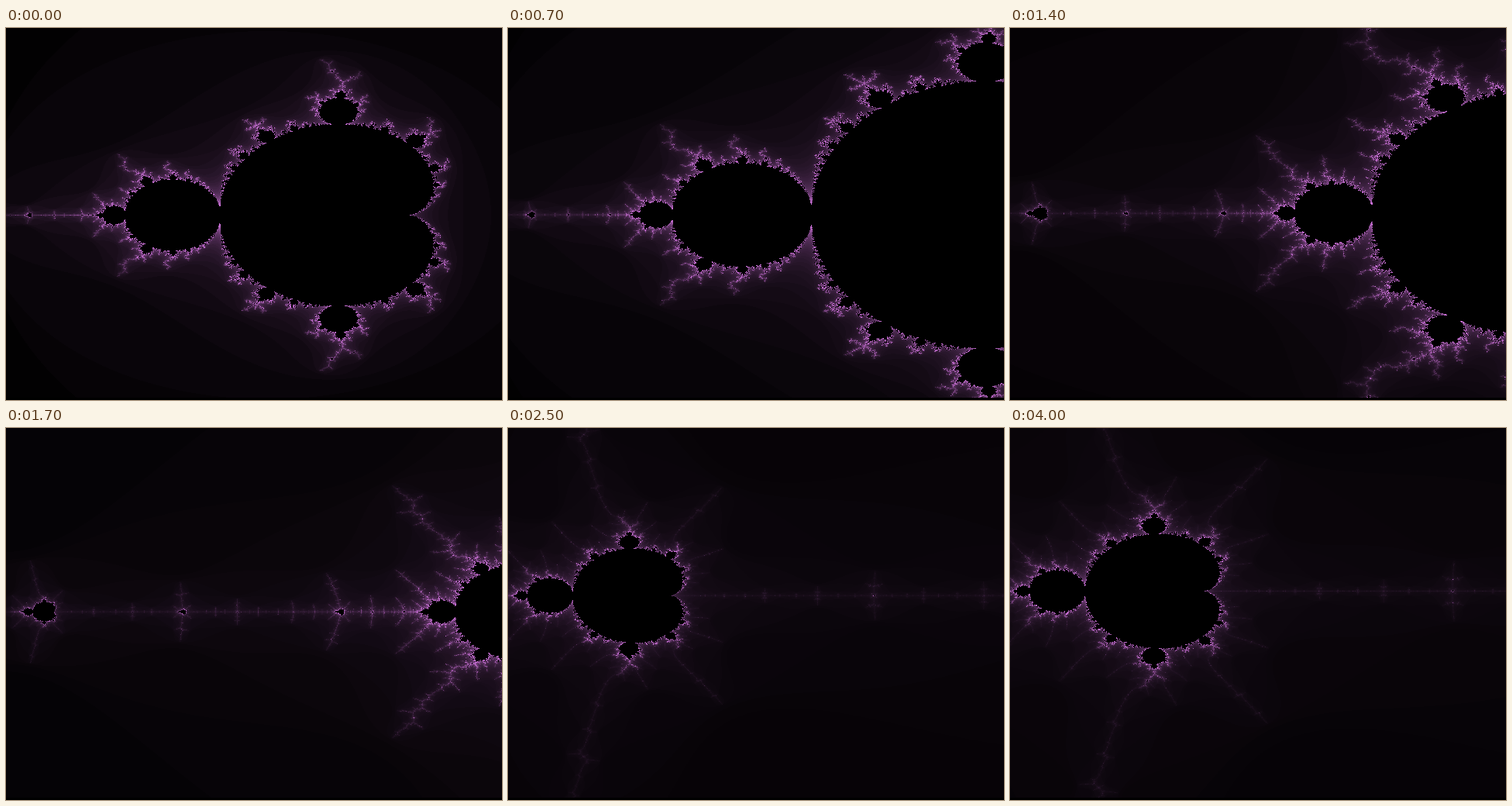
An HTML page with a canvas that plays this animation: 640x480 px, repeating every 4.7 s.

```html
<!DOCTYPE html>
<html lang="en">
<head>
<meta charset="utf-8">
<title>Mandelbrot zoom</title>
<style>
  html, body { margin: 0; width: 100%; height: 100%; overflow: hidden; background: #000; }
  canvas { display: block; width: 640px; height: 480px; }
</style>
</head>
<body>
<canvas id="stage" width="640" height="480"></canvas>
<script>
const W = 640, H = 480, VISIBLE_ROWS = 477;
const LOOP = 4700, STEP = 100, ZOOM_START = 400, LAST_STEP = 23;
const ASPECT = 0.736;

// Complex number under the pointer, and the pointer's row.
const anchor = { re: -1.7776, im: 0.00526, y: 241.9 };

// [step, natural log of pixels per unit, pointer column]
const zoomKeys = [[0, 5.497, 25.3], [3, 5.882, 23.3], [6, 6.2626, 22], [10, 6.738, 22],
                  [12, 7.01, 22], [18, 8.256, 22], [21, 8.82, 22], [23, 9.0186, 22]];

const ctx = document.getElementById('stage').getContext('2d');
const views = [];

function viewAt(step) {
  const i = Math.max(1, zoomKeys.findIndex(([s]) => s >= step));
  const [s0, z0, x0] = zoomKeys[i - 1], [s1, z1, x1] = zoomKeys[i];
  const part = (step - s0) / (s1 - s0);
  const zoom = z0 + (z1 - z0) * part;
  return {
    scale: Math.exp(zoom),
    x: x0 + (x1 - x0) * part,
    maxIter: Math.round(50 + 32 * (zoom - zoomKeys[0][1])),
  };
}

function inMainBulbs(re, im2) {
  const x = re - 0.25, q = x * x + im2;
  return q * (q + x) <= im2 / 4 || (re + 1) ** 2 + im2 <= 1 / 16;
}

// Number of iterations before escape, or 0 inside the set.
function escapeTime(re, im, maxIter) {
  if (inMainBulbs(re, im * im)) return 0;
  let x = 0, y = 0, xx = 0, yy = 0;
  for (let n = 1; n <= maxIter; n++) {
    y = 2 * x * y + im;
    x = xx - yy + re;
    xx = x * x;
    yy = y * y;
    if (xx + yy > 4) return n;
  }
  return 0;
}

function colour(t) {
  const v = Math.min(210, 260 * t ** 1.15);
  return 0xff000000 | v * 1.03 << 16 | v * 0.54 << 8 | v * 0.97;
}

function renderView(step) {
  const image = ctx.createImageData(W, H);
  const pixels = new Uint32Array(image.data.buffer).fill(0xff000000);
  const { scale, x, maxIter } = viewAt(step);
  const palette = Array.from({ length: maxIter + 1 }, (_, n) => colour(n / maxIter));
  for (let py = 0; py < VISIBLE_ROWS; py++) {
    const im = (py - anchor.y) / (scale * ASPECT) + anchor.im;
    for (let px = 0; px < W; px++) {
      const re = (px - x) / scale + anchor.re;
      pixels[py * W + px] = palette[escapeTime(re, im, maxIter)];
    }
  }
  return image;
}

const start = performance.now();
let shown = -1;

function draw() {
  const time = (performance.now() - start) % LOOP;
  const step = Math.max(0, Math.min(LAST_STEP, Math.floor((time - ZOOM_START) / STEP)));
  if (step !== shown) {
    views[step] ??= renderView(step);
    ctx.putImageData(views[step], 0, 0);
    shown = step;
  }
  requestAnimationFrame(draw);
}
draw();
</script>
</body>
</html>
```
